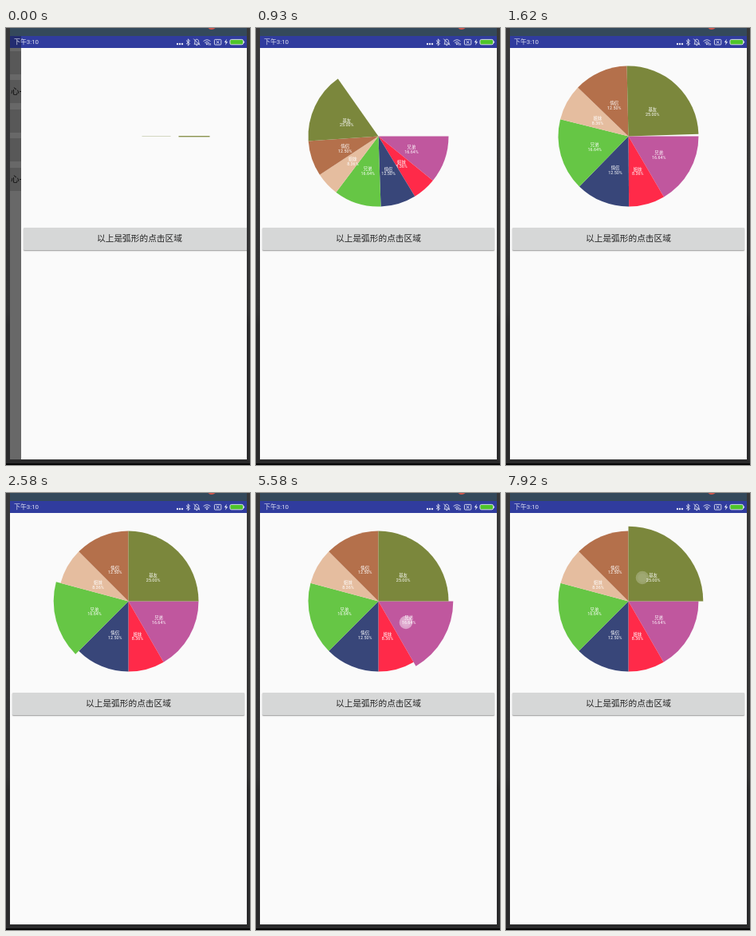
An HTML page with a canvas for the animation above (8000 ms loop, 306x547 px).

```html
<!DOCTYPE html>
<html lang="zh">
<head>
<meta charset="utf-8">
<title>Pie chart</title>
<style>
  html, body { margin: 0; width: 100%; height: 100%; overflow: hidden; }
  body {
    position: relative;
    background: linear-gradient(#383839, #323233 65%, #2a2a2b 68%, #2a2a2b);
    font-family: Roboto, "Noto Sans CJK SC", "Noto Sans CJK", sans-serif;
  }
  div, svg, canvas { position: absolute; display: block; }
  .top { left: 5px; top: 0; width: 297px; height: 10px; background: #34495b; overflow: hidden; }
  .top i { position: absolute; left: 247px; top: -10px; width: 12px; height: 12px; border-radius: 50%; background: #d0554c; }
  .floor { left: 0; top: 545px; width: 306px; height: 2px; background: #050505; }
  .screen { left: 5px; top: 10px; width: 297px; height: 530px; background: #686868; overflow: hidden; }
  .old { left: 0; width: 40px; height: 29px; background: #585858; color: #0c0c0c; font-size: 10.7px; line-height: 29px; text-indent: 1px; white-space: nowrap; }
  .bar { left: 0; top: 0; width: 297px; height: 15px; background: #303c9e; }
  .shade { left: 0; top: 0; width: 14px; height: 15px; background: #232c70; }
  .page { left: 0; top: 15px; width: 297px; height: 515px; background: #fafafa; }
  .button {
    left: 3px; top: 225px; width: 291px; height: 28px; border-radius: 1px;
    background: #d6d7d7; box-shadow: 0 1px 1.5px rgba(0,0,0,.38);
    color: #222; font-size: 10.7px; line-height: 28px; text-align: center; white-space: nowrap;
  }
  .clock { left: 10px; top: 11px; height: 14px; line-height: 14px; font-size: 7.9px; color: #e4e6f4; white-space: nowrap; }
  canvas, svg { left: 0; top: 0; }
</style>
</head>
<body>
<div class="top"><i></i></div>
<div class="floor"></div>
<div class="screen">
  <div class="old" style="top:19px"></div>
  <div class="old" style="top:55px">心+</div>
  <div class="old" style="top:92px"></div>
  <div class="old" style="top:128px"></div>
  <div class="old" style="top:165px">心+</div>
  <div class="page" id="page">
    <div class="button">以上是弧形的点击区域</div>
    <canvas id="pie" width="297" height="225"></canvas>
  </div>
  <div class="bar"></div>
  <div class="shade" id="shade"></div>
</div>
<div class="clock">下午3:10</div>
<svg width="306" height="30" fill="none" stroke="#e4e6f4" stroke-width=".9">
  <g fill="#e4e6f4" stroke="none">
    <circle cx="215" cy="20" r="1.2"/><circle cx="218" cy="20" r="1.2"/><circle cx="221" cy="20" r="1.2"/>
  </g>
  <path d="M226 15.6l4.6 4.1-2.3 2.2v-8l2.3 2.2-4.6 4"/>
  <path d="M236 20.2h6.6c-1.2-1-.7-4-1.4-5-.9-1.3-3-1.3-3.9 0-.7 1 0 4-1.3 5zM238.4 21.6h1.8M235.3 13.6l7.8 7.8"/>
  <path d="M247.6 16.6q4.4-3.6 8.8 0M249.2 18.4q2.8-2.2 5.6 0"/>
  <path d="M250.3 19.2h3.4L252 21.4z" fill="#e4e6f4" stroke="none"/>
  <path id="traffic" d="M254.6 19v2.6M256.3 19v2.6" stroke-width=".8"/>
  <rect x="261.4" y="14.4" width="8.4" height="6.6" rx="1"/>
  <path d="M263.8 16l3.6 3.4M267.4 16l-3.6 3.4"/>
  <path d="M276.8 13.8l-3 4.2h2l-.8 3.6 3.2-4.4h-2.1z" fill="#e4e6f4" stroke="none"/>
  <rect x="280.9" y="14.4" width="16.6" height="6.4" rx="1.8" fill="#4fc52c"/>
  <path d="M298.6 16.4v2.4"/>
</svg>
<script>
const LOOP = 8000, CX = 148.5, CY = 110.5, R = 88, POP = 93.8, LABEL_R = 44;

const slices = [
  ["兄弟", 16.64, "#c0579e"],
  ["姐妹", 8.36, "#ff2a49"],
  ["情侣", 12.5, "#384679"],
  ["兄弟", 16.64, "#66c645"],
  ["姐妹", 8.36, "#e5bd9f"],
  ["情侣", 12.5, "#b4704b"],
  ["基友", 25, "#7b873c"]
];

// press time, touch end, slice, touch x, touch y
const taps = [
  [2020, 2580, 3, 95, 129],
  [3010, 3430, 4, 92, 82],
  [3710, 4100, 5, 131, 47],
  [4410, 4860, 6, 180, 72],
  [5580, 5850, 0, 183, 137],
  [6280, 6550, 1, 160, 170],
  [6820, 7370, 2, 112, 164],
  [7800, 8200, 6, 166, 81]
];

// moments at which the opening sweep is redrawn
const ticks = [120, 260, 400, 520, 660, 800, 930, 1060, 1200, 1350, 1490, 1620, 1770];

const byId = id => document.getElementById(id);
const page = byId("page"), shade = byId("shade"), traffic = byId("traffic");
const ctx = byId("pie").getContext("2d");

function sweepAt(t) {
  const tick = ticks.filter(k => k <= t).pop();
  if (!tick) return 0;
  const p = Math.min(1, (tick + 225) / 1930);
  return (1 - Math.cos(Math.PI * p)) / 2;
}

function drawSlice([name, share, color], from, to, radius) {
  ctx.fillStyle = color;
  ctx.beginPath();
  ctx.moveTo(CX, CY);
  ctx.arc(CX, CY, radius, from, to);
  ctx.fill();

  const mid = (from + to) / 2;
  const x = CX + LABEL_R * Math.cos(mid), y = CY + LABEL_R * Math.sin(mid);
  ctx.fillStyle = "#fff";
  ctx.fillText(name, x, y + 0.9);
  ctx.fillText(share.toFixed(2) + "%", x, y + 6.4);
}

function drawPie(sweep, open) {
  let sum = 0;
  slices.forEach((s, i) => {
    const from = sum;
    sum += s[1] / 100 * sweep * 2 * Math.PI;
    drawSlice(s, from, sum, i === open ? POP : R);
  });
}

// the chart while it is still a sliver
function drawSliver() {
  ctx.fillStyle = "rgba(123,135,60,.3)";
  ctx.fillRect(CX + 3, CY - .5, 36, 1);
  ctx.fillStyle = "#8b9450";
  ctx.fillRect(CX + 49, CY - .5, 39, 1.4);
}

function drawTouch(t, [start, end, , x, y]) {
  if (t >= end) return;
  ctx.fillStyle = `rgba(255,255,255,${t - start < 110 ? 0.45 : 0.24})`;
  for (const r of [8.3, 5.5]) {
    ctx.globalAlpha = r > 6 ? 1 : 0.25;
    ctx.beginPath();
    ctx.arc(x, y, r, 0, 2 * Math.PI);
    ctx.fill();
  }
  ctx.globalAlpha = 1;
}

function draw(now) {
  const t = now % LOOP;
  const sliding = t < 120;
  page.style.left = sliding ? "14px" : "0";
  shade.style.display = sliding ? "block" : "none";
  const busy = t < 2310 || (t >= 3010 && t < 3430) || (t >= 4410 && t < 6820);
  traffic.style.display = busy ? "" : "none";

  ctx.clearRect(0, 0, 297, 225);
  ctx.font = '5.4px Roboto, "Noto Sans CJK SC", "Noto Sans CJK", sans-serif';
  ctx.textAlign = "center";
  if (sliding) {
    drawSliver();
  } else {
    const tap = taps.filter(k => k[0] <= t).pop();
    drawPie(sweepAt(t), tap ? tap[2] : -1);
    if (tap) drawTouch(t, tap);
  }
  requestAnimationFrame(draw);
}
draw(performance.now());
</script>
</body>
</html>
```
